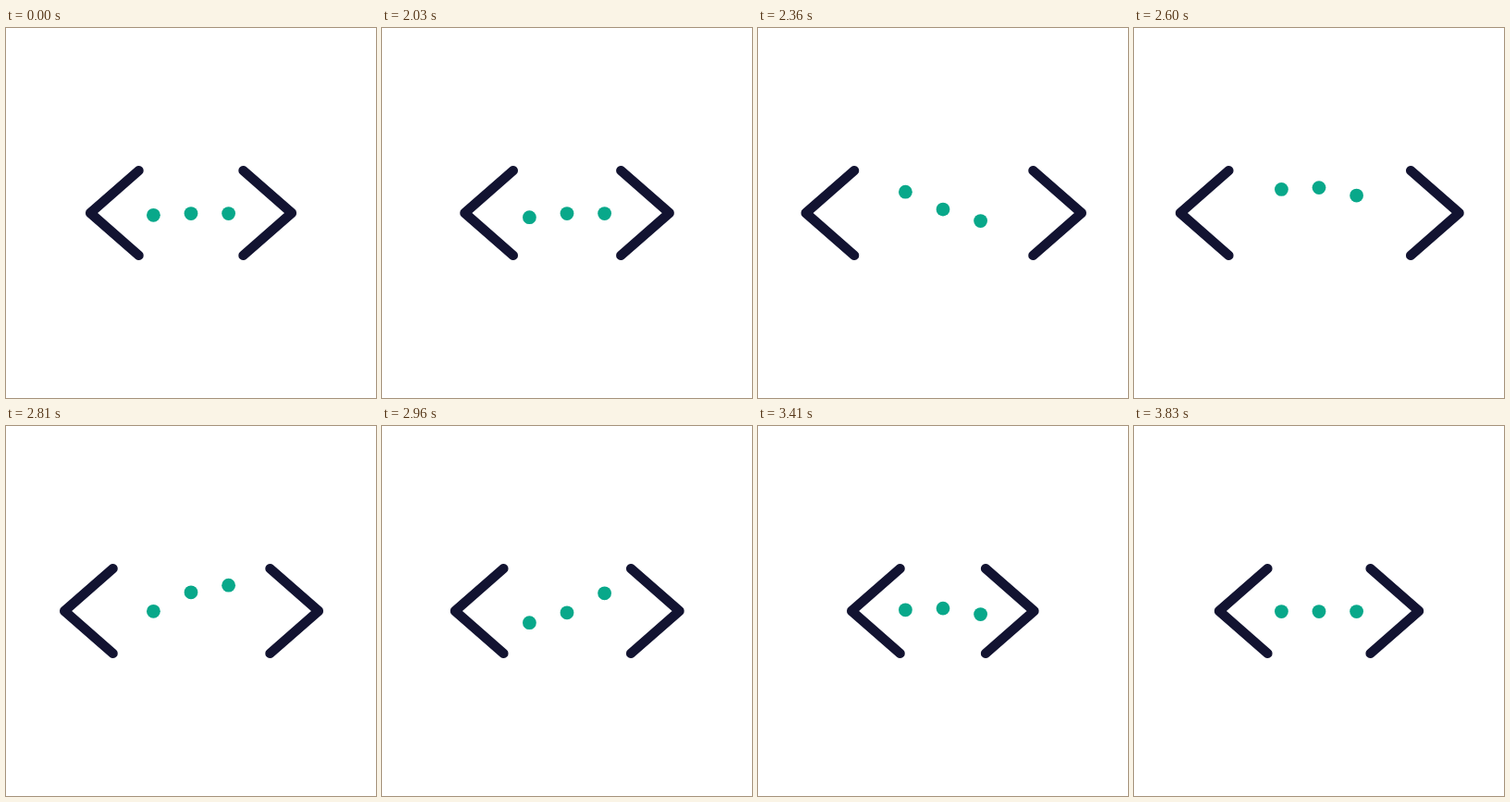
Recreate the animation shown at these times as an HTML page with a canvas. Size 400 by 400 pixels, loop 3.92 s.

```html
<!DOCTYPE html>
<html lang="en">
<head>
<meta charset="utf-8">
<title>Code brackets with bouncing dots</title>
<style>
  html, body { margin: 0; width: 100%; height: 100%; overflow: hidden; background: #fff; }
  canvas { display: block; width: 400px; height: 400px; }
</style>
</head>
<body>
<canvas id="stage" width="400" height="400"></canvas>
<script>
const ctx = document.getElementById('stage').getContext('2d');

const LOOP = 3920, HOLD = 2000, STEP = 30, LAST = 61;
const DOT_DELAY = 4.7;
const RIGHT_REACH = 1.037;
const EASE = [1 / 3, 2 / 3];
const SNAP = [0.2, 0.33];
const DROP = [0.53, 0.707];

// Keys: [step, value, easing towards the next key]
const SPREAD = [[-1.3, 0], [14, 42.3], [18.9, 42.3], [43.8, -12], [54, 0]];
const BOUNCE = [[-1.5, 0], [4, 9.5, SNAP], [17, -28.5, DROP],
                [31.3, 12.3], [42.5, -3.5], [51.6, 0]];

// Cubic Bezier easing with flat ends, solved by bisection
function ease(u, [x1, x2]) {
  let lo = 0, hi = 1;
  for (let i = 0; i < 24; i++) {
    const s = (lo + hi) / 2, r = 1 - s;
    const x = 3 * x1 * s * r * r + 3 * x2 * s * s * r + s * s * s;
    if (x < u) lo = s; else hi = s;
  }
  return lo * lo * (3 - 2 * lo);
}

function valueAt(keys, n) {
  if (n <= keys[0][0]) return keys[0][1];
  for (let i = 1; i < keys.length; i++) {
    const [a, from, curve = EASE] = keys[i - 1];
    const [b, to] = keys[i];
    if (n < b) return from + (to - from) * ease((n - a) / (b - a), curve);
  }
  return keys[keys.length - 1][1];
}

function bracket(side, spread) {
  const end = 200 + side * (55.6 + spread);
  const tip = 200 + side * (108 + spread);
  ctx.beginPath();
  ctx.moveTo(end, 154.2);
  ctx.lineTo(tip, 200);
  ctx.lineTo(end, 245.8);
  ctx.stroke();
}

function dot(i, n) {
  ctx.beginPath();
  ctx.arc(200 + (i - 1) * 40.6, 200.6 + valueAt(BOUNCE, n - i * DOT_DELAY), 7.4, 0, Math.PI * 2);
  ctx.fill();
}

function draw(ms) {
  const n = Math.min(LAST, Math.max(0, Math.floor((ms - HOLD) / STEP)));
  ctx.fillStyle = '#fff';
  ctx.fillRect(0, 0, 400, 400);

  ctx.strokeStyle = '#121331';
  ctx.lineWidth = 10.4;
  ctx.lineCap = ctx.lineJoin = 'round';
  const spread = valueAt(SPREAD, n);
  bracket(-1, spread);
  bracket(1, spread * RIGHT_REACH);

  ctx.fillStyle = '#08a88a';
  for (let i = 0; i < 3; i++) dot(i, n);
}

const start = performance.now();
function tick() {
  draw((performance.now() - start) % LOOP);
  requestAnimationFrame(tick);
}
tick();
</script>
</body>
</html>
```
